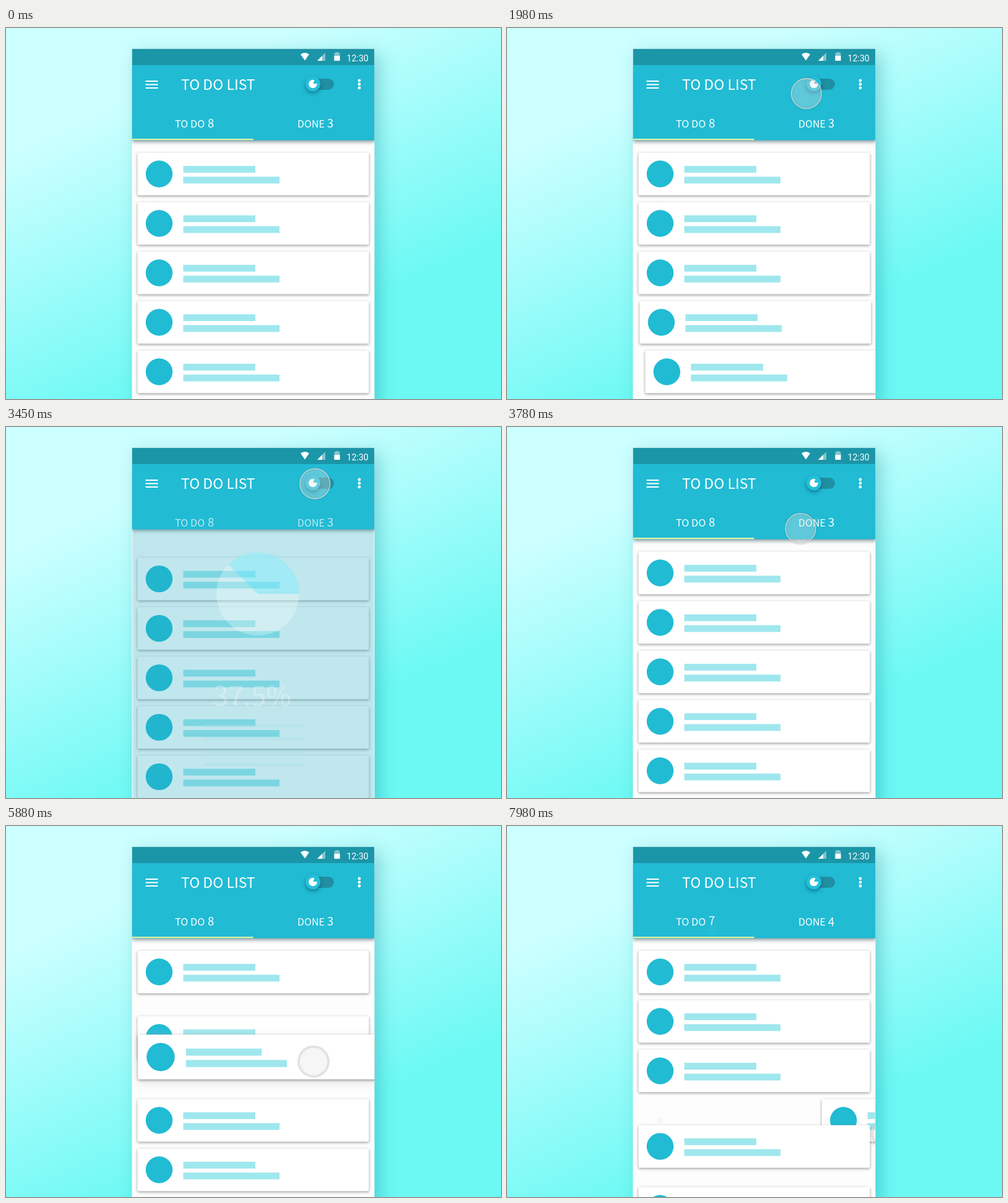
An HTML page with a canvas that plays this animation: 800x600 px, repeating every 8 s.

```html
<!DOCTYPE html>
<html lang="en">
<head>
<meta charset="utf-8">
<title>To do list</title>
<style>
  html, body { margin: 0; width: 100%; height: 100%; overflow: hidden; }
  body { background: linear-gradient(156deg, #ccffff 22%, #6cf9f4 73%); }
  canvas { display: block; }
</style>
</head>
<body>
<canvas id="stage" width="800" height="600"></canvas>
<script>
const ctx = document.getElementById('stage').getContext('2d');
const LOOP = 8000, CYAN = '#21bbd4', PALE = '#9fe7ee', TAU = Math.PI * 2;
const SANS = '"Noto Sans CJK SC", "Noto Sans CJK JP", "Noto Sans CJK", "Open Sans", sans-serif';
const LEFT = 203.5, TOP = 33.5, WIDTH = 392, PITCH = 80, SWIPE_START = 318;

// Finger moves: begin, end, x, y
const MOVES = [
  [300, 600, 500, 157],
  [900, 1320, 306, 157],
  [1480, 2215, 504, 90],
  [3400, 4430, 455, 330],
  [4430, 4740, 485, 354],
  [4740, 5880, 497, 381],
  [6400, 7150, SWIPE_START, 497],
  [7450, 8250, 652, 497]
];

const clamp = v => Math.max(0, Math.min(1, v));
const part = (t, a, b) => clamp((t - a) / (b - a));
const smooth = u => u * u * (3 - 2 * u);
const ease = (t, a, b) => smooth(part(t, a, b));
const decel = (t, a, length) => 1 - (1 - part(t, a, a + length)) ** 3;
const pulse = (t, a, b, c, d) => ease(t, a, b) - ease(t, c, d);

function fingerAt(t) {
  return MOVES.reduce(([px, py], [a, b, x, y]) => {
    const u = part(t, a, b);
    return [px + (x - px) * u * (2 - u), py + (y - py) * smooth(u)];
  }, [500, 200]);
}

function rect(x, y, w, h, color) {
  ctx.fillStyle = color;
  ctx.fillRect(x, y, w, h);
}
function disc(x, y, r, color) {
  ctx.fillStyle = color;
  ctx.beginPath();
  ctx.arc(x, y, r, 0, TAU);
  ctx.fill();
}
function ring(x, y, r, color, width) {
  ctx.strokeStyle = color;
  ctx.lineWidth = width;
  ctx.beginPath();
  ctx.arc(x, y, r, 0, TAU);
  ctx.stroke();
}
function wedge(x, y, r, from, color) {
  ctx.fillStyle = color;
  ctx.beginPath();
  ctx.moveTo(x, y);
  ctx.arc(x, y, r, from, 0);
  ctx.fill();
}
function round(x, y, w, h, r, color) {
  ctx.fillStyle = color;
  ctx.beginPath();
  ctx.roundRect(x, y, w, h, r);
  ctx.fill();
}
function corner(x, y, size, color) {
  ctx.fillStyle = color;
  ctx.beginPath();
  ctx.moveTo(x, y);
  ctx.lineTo(x + size, y);
  ctx.lineTo(x + size, y - size);
  ctx.fill();
}
function label(text, x, y, size, align = 'left', font = SANS) {
  ctx.font = `${size}px ${font}`;
  ctx.textAlign = align;
  ctx.fillStyle = '#fff';
  ctx.fillText(text, x, y);
}
function group(draw, alpha = 1) {
  ctx.save();
  ctx.globalAlpha *= alpha;
  draw();
  ctx.restore();
}
function clip(x, y, w, h) {
  ctx.beginPath();
  ctx.rect(x, y, w, h);
  ctx.clip();
}
function shadow(color, blur, y = 0, x = 0) {
  Object.assign(ctx, { shadowColor: color, shadowBlur: blur, shadowOffsetX: x, shadowOffsetY: y });
}

function card(dx, y, scale = 1) {
  if (Math.abs(dx) > WIDTH) return;
  const lift = (scale - 1) * 10;
  const sheet = (...cast) => group(() => {
    shadow(...cast);
    round(-187, -34.5, 374, 69, 2, '#fff');
  });
  group(() => {
    ctx.translate(399.5 + dx, y);
    ctx.scale(scale, scale);
    if (lift > 0) sheet(`rgba(205,205,205,${lift})`, 18, 9 * lift);
    sheet('rgba(0,0,0,.4)', 4, 1.5);
    disc(-152, 0, 21.7, CYAN);
    rect(-113, -13, 116.5, 11, PALE);
    rect(-113, 4.5, 155.5, 11, PALE);
  });
}

function cards(t, drop) {
  const enter = (start, i) => WIDTH * (1 - decel(t, start + 60 * i, 450));
  const leave = (start, i) => -420 * part(t, start + 40 * i, start + 40 * i + 280) ** 2;
  const rowY = i => 236 + PITCH * i + drop;

  for (let i = 0; i < 3; i++) {
    if (t < 1700) card(enter(900, i) + leave(1300, i), rowY(i));
  }

  if (t > 7650) ring(247, 476, 3 + 7 * (1 - part(t, 7680, 7980)), '#dbf5f8', 1.5);

  const swap = 0.16 * ease(t, 4430, 4740) + 0.56 * ease(t, 4740, 5880) + 0.28 * ease(t, 5880, 6250);
  const swipe = t > 7450 ? fingerAt(t)[0] - SWIPE_START : 0;
  for (const i of [0, 2, 3, 4, 5, 6, 1]) {
    let dx = t < 1425 ? leave(830, i) : enter(1427, i), y = rowY(i), scale = 1;
    if (i === 1) {
      dx += 10 * pulse(t, 4430, 5000, 5880, 6200);
      y += PITCH * swap;
      scale += 0.1 * pulse(t, 4430, 4650, 5580, 6180);
    }
    if (i === 2) y -= PITCH * swap ** 1.2;
    if (i === 3) dx += swipe;
    if (i > 3) y -= PITCH * ease(t, 7380 + 90 * i, 7880 + 90 * i);
    card(dx, y, scale);
  }
}

function chart(t, shown) {
  group(() => {
    rect(204.5, 60, 390, 540, '#23aabf');
    disc(407, 270, 67, '#fcfffe');
    wedge(407, 270, 67, -ease(t, 2435, 3175) * 0.375 * TAU, '#2be0fb');
    label('37.5%', 398, 451, 44, 'center');
    for (let i = 0; i < 4; i++) {
      const y = 483 + 21 * i + 36 * (1 - decel(t, 2677 + 81 * i, 350));
      rect(319, y - 3, 162, 6, '#a2dce6');
    }
  }, shown * 0.99);
}

function toggle(on) {
  const x = 496 + 21 * on;
  round(488, 82, 42, 18, 9, '#208fa1');
  group(() => round(486, 82, 42, 18, 9, '#f4ffff'), on);
  group(() => {
    shadow('rgba(0,60,80,.5)', 6, 3);
    disc(x, 90.5, 12, '#25bfd9');
  });
  group(() => {
    disc(x, 90.5, 6.8, '#fff');
    wedge(x + 0.5, 90, 7.6, -1.25, '#25bfd9');
  }, 1 - on);
}

function counter(before, after, x, direction, p) {
  group(() => label(before, x, 161 + 15 * direction * p, 18.5), 1 - p);
  group(() => label(after, x, 161 - 15 * direction * (1 - p), 18.5), p);
}

function header(t, shown) {
  const height = 121.5 - 56.5 * shown;
  group(() => {
    shadow('rgba(0,40,50,.5)', 6, 2);
    rect(LEFT, 60, WIDTH, height, CYAN);
  });
  group(() => {
    clip(LEFT, 60, WIDTH, height);
    const p = decel(t, 7600, 620);
    label('TO DO', 273, 160.5, 16.3);
    label('DONE', 471, 160.5, 16);
    counter('8', '7', 326, 1, p);
    counter('3', '4', 519, -1, p);
    rect(LEFT + WIDTH / 2 * pulse(t, 780, 1080, 1370, 1640), 179, WIDTH / 2, 2.5, '#dcf5a8');
  }, 1 - shown);

  for (let i = 0; i < 3; i++) {
    rect(225.5, 85 + 5.5 * i, 20, 2, '#fff');
    disc(571, 85 + 6 * i, 2.4, '#fff');
  }
  label('TO DO LIST', 283, 99.5, 23);
  toggle(pulse(t, 2250, 2480, 3220, 3420));
}

function statusBar() {
  rect(LEFT, TOP, WIDTH, 60 - TOP, '#1b95a8');
  ctx.fillStyle = '#fff';
  ctx.beginPath();
  ctx.moveTo(483, 52.5);
  ctx.lineTo(476, 42.5);
  ctx.quadraticCurveTo(483, 37.5, 490, 42.5);
  ctx.fill();
  corner(503, 53, 13, '#80c5cf');
  corner(503, 53, 8, '#fff');
  rect(533, 39, 4, 2, '#80c5cf');
  round(530.5, 40, 9, 13, 1, '#80c5cf');
  rect(530.5, 45, 9, 8, '#fff');
  label('12:30', 550.5, 53.5, 14.2, 'left', 'Roboto, sans-serif');
}

function finger(t) {
  const [x, y] = fingerAt(t);
  group(() => {
    disc(x, y, 24, 'rgba(228,228,228,.32)');
    shadow('rgba(0,0,0,.25)', 3);
    ring(x, y, 24.3, 'rgba(218,222,222,.75)', 1.8);
  }, part(t, 250, 450));
}

function draw(t) {
  const shown = pulse(t, 2330, 2700, 3250, 3560);
  ctx.clearRect(0, 0, 800, 600);
  group(() => {
    shadow('rgba(0,120,140,.3)', 26, 8, 8);
    rect(LEFT, TOP, WIDTH, 600, '#fdfdfd');
  });
  group(() => {
    clip(LEFT, TOP, WIDTH, 600);
    cards(t, 34 * shown);
    if (shown > 0) chart(t, shown);
    header(t, shown);
    statusBar();
    finger(t);
  });
}

const start = performance.now();
function tick() {
  draw((performance.now() - start) % LOOP);
  requestAnimationFrame(tick);
}
tick();
</script>
</body>
</html>
```
